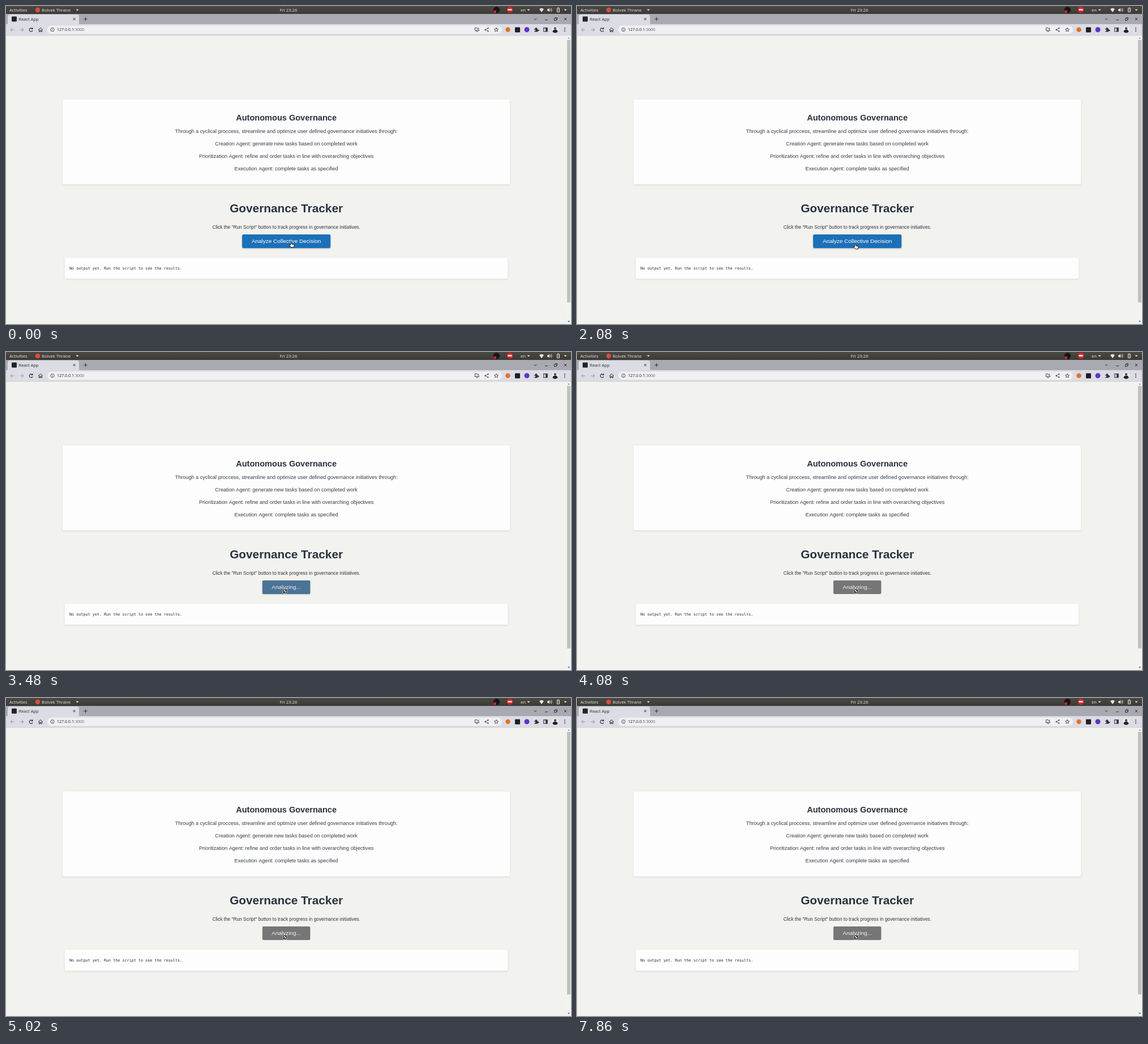
An HTML page with a canvas that plays this animation: 998 px wide and 561 px high, repeating every 8000 ms.

```html
<!DOCTYPE html>
<html lang="en">
<head>
<meta charset="utf-8">
<title>Governance Tracker</title>
<style>
  html, body { margin: 0; width: 100%; height: 100%; overflow: hidden; background: #f2f2ef; }
  canvas { display: block; width: 998px; height: 561px; }
</style>
</head>
<body>
<canvas id="stage"></canvas>
<script>
const W = 998, H = 561, LOOP = 8000, MID = 495.1;
const CLICK = 3400, FADE = 300;
const MOVE_START = 100, MOVE_END = 1300;
const SANS = '"Liberation Sans", Arial, sans-serif';
const UI = '"Open Sans", "Noto Sans", sans-serif';
const MONO = '"DejaVu Sans Mono", monospace';
const INK = '#27323f', PANEL = '#ebe7dd', ICON = '#303138';

const stage = document.getElementById('stage');
const c = stage.getContext('2d');
const dpr = window.devicePixelRatio || 1;
stage.width = W * dpr;
stage.height = H * dpr;

const clamp = v => Math.min(1, Math.max(0, v));
const smooth = v => v * v * (3 - 2 * v);

function rect(x, y, w, h, color, r = 0) {
  c.beginPath();
  c.roundRect(x, y, w, h, r);
  c.fillStyle = color;
  c.fill();
}

function disc(x, y, r, color) {
  c.beginPath();
  c.arc(x, y, r, 0, Math.PI * 2);
  c.fillStyle = color;
  c.fill();
}

function ring(x, y, r, color, width = 1, from = 0, to = Math.PI * 2) {
  c.beginPath();
  c.arc(x, y, r, from, to);
  c.strokeStyle = color;
  c.lineWidth = width;
  c.stroke();
}

// Strokes (or fills) an SVG-style path placed at x, y.
function icon(x, y, d, color = ICON, width = 1, filled = false) {
  c.save();
  c.translate(x, y);
  const p = new Path2D(d);
  c.strokeStyle = c.fillStyle = color;
  c.lineWidth = width;
  if (filled) c.fill(p); else c.stroke(p);
  c.restore();
}

function text(s, x, y, size, color, { font = SANS, weight = 400, align = 'left' } = {}) {
  c.font = `${weight} ${size}px ${font}`;
  c.textAlign = align;
  c.fillStyle = color;
  c.fillText(s, x, y);
}

const centered = (s, y, size, color, weight) =>
  text(s, MID, y, size, color, { weight, align: 'center' });

function shadowed(draw, alpha = 0.12) {
  c.save();
  c.shadowColor = `rgba(0,0,0,${alpha})`;
  c.shadowBlur = 2.5 * dpr;
  c.shadowOffsetY = dpr;
  draw();
  c.restore();
}

function caret(x, y, color) {
  icon(x, y, 'M-2.5-1.2H2.5L0 1.6Z', color, 1, true);
}

function drawPanel() {
  const g = c.createLinearGradient(0, 0, 0, 14);
  g.addColorStop(0, '#4b4943');
  g.addColorStop(1, '#3b3a36');
  rect(0, 0, W, 14, g);
  const ui = { font: UI, weight: 500 };
  text('Activities', 6, 9.8, 7.7, PANEL, ui);
  disc(56, 7, 4.2, '#dd4b3e');
  text('Bolvek Thrane', 63, 9.8, 7.7, PANEL, ui);
  caret(126, 7, PANEL);
  text('Fri 23:26', 499, 9.8, 7.7, PANEL, { ...ui, align: 'center' });

  disc(866.5, 6.8, 5.6, '#161616');
  disc(863.8, 10, 2.4, '#e0202a');
  disc(890, 6.5, 5.4, '#d8262c');
  rect(886.5, 5.3, 7, 2.4, '#fff');
  text('en', 909, 9.8, 7.7, PANEL, ui);
  caret(923, 7, PANEL);
  icon(946, 7, 'M-4-1.5Q0-5 4-1.5L0 4Z', PANEL, 1, true);
  icon(960, 7, 'M-4-1.5H-2L0-3.5V3.5L-2 1.5H-4Z', PANEL, 1, true);
  ring(959.5, 7, 2.6, PANEL, 0.9, -0.8, 0.8);
  ring(959.5, 7, 4.6, PANEL, 0.9, -0.8, 0.8);
  icon(975.5, 7, 'M-2-3H2V3.5H-2ZM-1-4H1', PANEL, 1);
  icon(975.5, 7, 'M.8-2L-1 .6H.2L-.5 2.5L1.2-.2H0Z', PANEL, 0.6, true);
  caret(988, 7, PANEL);
}

function drawTabs() {
  rect(0, 14, W, 18, '#a9a9b2');
  rect(3, 15, 126, 20, '#dcdce4', 4);
  rect(10, 18.5, 9, 9, '#20242b', 1);
  text('React App', 22.5, 25.5, 7.5, '#28292e', { font: UI });
  icon(120.5, 23, 'M-2-2L2 2M2-2L-2 2', ICON, 1);
  icon(140.5, 23, 'M-3.2 0H3.2M0-3.2V3.2', ICON, 1);
  icon(935, 23, 'M-2.2-1L0 1.2L2.2-1', ICON, 1);
  icon(954.5, 24.5, 'M-2.5 0H2.5', ICON, 1);
  icon(971, 23, 'M-2.5-1H1V2.5H-2.5ZM-1-1V-2.5H2.5V1H1', ICON, 0.9);
  icon(988, 23, 'M-2.3-2.3L2.3 2.3M2.3-2.3L-2.3 2.3', ICON, 1);
}

function drawToolbar() {
  rect(0, 32, W, 20, '#dcdce4');
  rect(73, 34.5, 803, 14.5, '#f0f0f4', 7.2);
  rect(0, 51.5, W, 0.7, '#c6c6cc');

  icon(11, 42, 'M3.5 0H-3M0-3L-3 0L0 3', '#929299');
  icon(28, 42, 'M-3.5 0H3M0-3L3 0L0 3', '#929299');
  ring(44.3, 42, 3, ICON, 1.1, 0.4, 5.6);
  icon(46.5, 39.8, 'M1-2.2V1.3H-2.5Z', ICON, 1, true);
  icon(61, 42, 'M-3.8 0L0-3.6L3.8 0M-2.6-.8V3.4H-.8V.8H.8V3.4H2.6V-.8', ICON);
  ring(82, 41.7, 3.2, '#46474e', 0.9);
  icon(82, 41.7, 'M0-1.8V-.9M0-.2V1.8', '#46474e', 0.9);
  text('127.0.0.1', 90, 44.4, 7.1, '#1e1f24', { font: UI });
  text(':3000', 90 + c.measureText('127.0.0.1').width, 44.4, 7.1, '#5f6067', { font: UI });

  icon(832, 41.5, 'M0-3H-3.5V2H3.5V.5M-1.5 3.5H1.5M2-3.5V-.5M.5-1.5L2 0L3.5-1.5', ICON, 0.9);
  icon(849, 41.8, 'M2.5-2.7L-2.5 0L2.5 2.7', ICON, 0.8);
  for (const [x, y] of [[2.5, -2.7], [-2.5, 0], [2.5, 2.7]]) disc(849 + x, 41.8 + y, 1.1, ICON);
  icon(866, 41.8, 'M0-3.6L1-1.2L3.6-1L1.6.7L2.3 3.2L0 1.8L-2.3 3.2L-1.6.7L-3.6-1L-1-1.2Z', ICON, 0.8);

  disc(886.5, 41.7, 4.2, '#dc7428');
  rect(899, 37.5, 9, 9, '#1c1c22', 1);
  disc(920, 41.7, 4.5, '#6134c4');
  icon(936.5, 42, 'M-3.3-2H-1.4A1.4 1.4 0 1 1 1.2-2H2.6V.1A1.4 1.4 0 1 1 2.6 2V3.6H-3.3V1.8A1.3 1.3 0 1 0-3.3-.2Z', ICON, 1, true);
  icon(953, 41.8, 'M-3.2-3.2H3.2V3.2H-3.2Z', ICON, 1.1);
  rect(953.2, 38.6, 3, 6.4, ICON);

  disc(970, 41.8, 6, '#ececef');
  disc(970, 39.3, 2.1, '#54453e');
  icon(970, 41.8, 'M-4.6 3.6Q-4-.2 0-.2Q4-.2 4.6 3.6Q0 7.6-4.6 3.6Z', '#202127', 1, true);
  for (const y of [39, 41.8, 44.6]) disc(987, y, 0.9, ICON);
}

function drawPage() {
  rect(0, 52, W, H - 52, '#f2f2ef');
  shadowed(() => rect(100, 165, 790.2, 149.7, '#fdfdfd', 2));
  centered('Autonomous Governance', 202.2, 14.555, INK, 700);
  [
    'Through a cyclical proccess, streamline and optimize user defined governance initiatives through:',
    'Creation Agent: generate new tasks based on completed work',
    'Prioritization Agent: refine and order tasks in line with overarching objectives',
    'Execution Agent: complete tasks as specified'
  ].forEach((line, i) => centered(line, 224.4 + i * 21.9, 9.148, '#363d47'));

  centered('Governance Tracker', 364.1, 20.79, INK, 700);
  centered('Click the "Run Script" button to track progress in governance initiatives.', 392.7, 8.317, '#30343a');

  shadowed(() => rect(103.7, 444, 782.5, 37.2, '#fdfdfd', 2));
  text('No output yet. Run the script to see the results.', 112, 465.3, 6.757, '#2b2d31', { font: MONO });

  rect(990, 52, 8, H - 52, '#f3f3f3');
  rect(991, 60, 6, 463, '#c0c0c0');
  icon(994, 56.5, 'M-2 1L0-1.3L2 1Z', '#8b8b8b', 1, true);
  icon(994, 556.5, 'M-2-1L0 1.3L2-1Z', '#505050', 1, true);
}

function drawButton(t) {
  const busy = t >= CLICK;
  const k = 1 - (1 - clamp((t - CLICK) / FADE)) ** 2.3;
  const from = [28, 112, 184], to = [118, 118, 118];
  const color = `rgb(${from.map((v, i) => Math.round(v + (to[i] - v) * k))})`;
  const w = busy ? 84.5 : 156;
  shadowed(() => rect(MID - w / 2, 403, w, 24, color, 2), 0.3 * (1 - k));
  centered(busy ? 'Analyzing...' : 'Analyze Collective Decision', 418.4, 9.98, busy ? '#f2f2f2' : '#fff');
}

function drawCursor(t) {
  if (t >= CLICK) {
    disc(492.7, 422, 4.5, '#fff');
    ring(492.7, 422, 3.1, '#111', 1.4);
    icon(492.7, 422, 'M-2.1 2.1L2.1-2.1', '#111', 1.3);
    return;
  }
  const k = smooth(clamp((t - MOVE_START) / (MOVE_END - MOVE_START)));
  const x = 505 - 12 * k, y = 421 + 3 * k;
  const hand = 'M-2.4-4.4Q-1.5-5.3-.8-4.3V-1.4L3-.7Q4.2-.3 4.1 1L3.4 4.7H-1.4L-4.2 1.1Q-4.3-.1-3.2.2L-2.4 1Z';
  icon(x, y, hand, '#fff', 1, true);
  icon(x, y, hand, '#111', 0.9);
  icon(x, y, 'M.7-1V.9M2.2-.7V1', '#111', 0.5);
}

function frame(now) {
  const t = now % LOOP;
  c.setTransform(dpr, 0, 0, dpr, 0, 0);
  drawPage();
  drawTabs();
  drawToolbar();
  drawPanel();
  drawButton(t);
  drawCursor(t);
}

let start;
function tick(now) {
  start ??= now;
  frame(now - start);
  requestAnimationFrame(tick);
}
frame(0);
requestAnimationFrame(tick);
</script>
</body>
</html>
```
